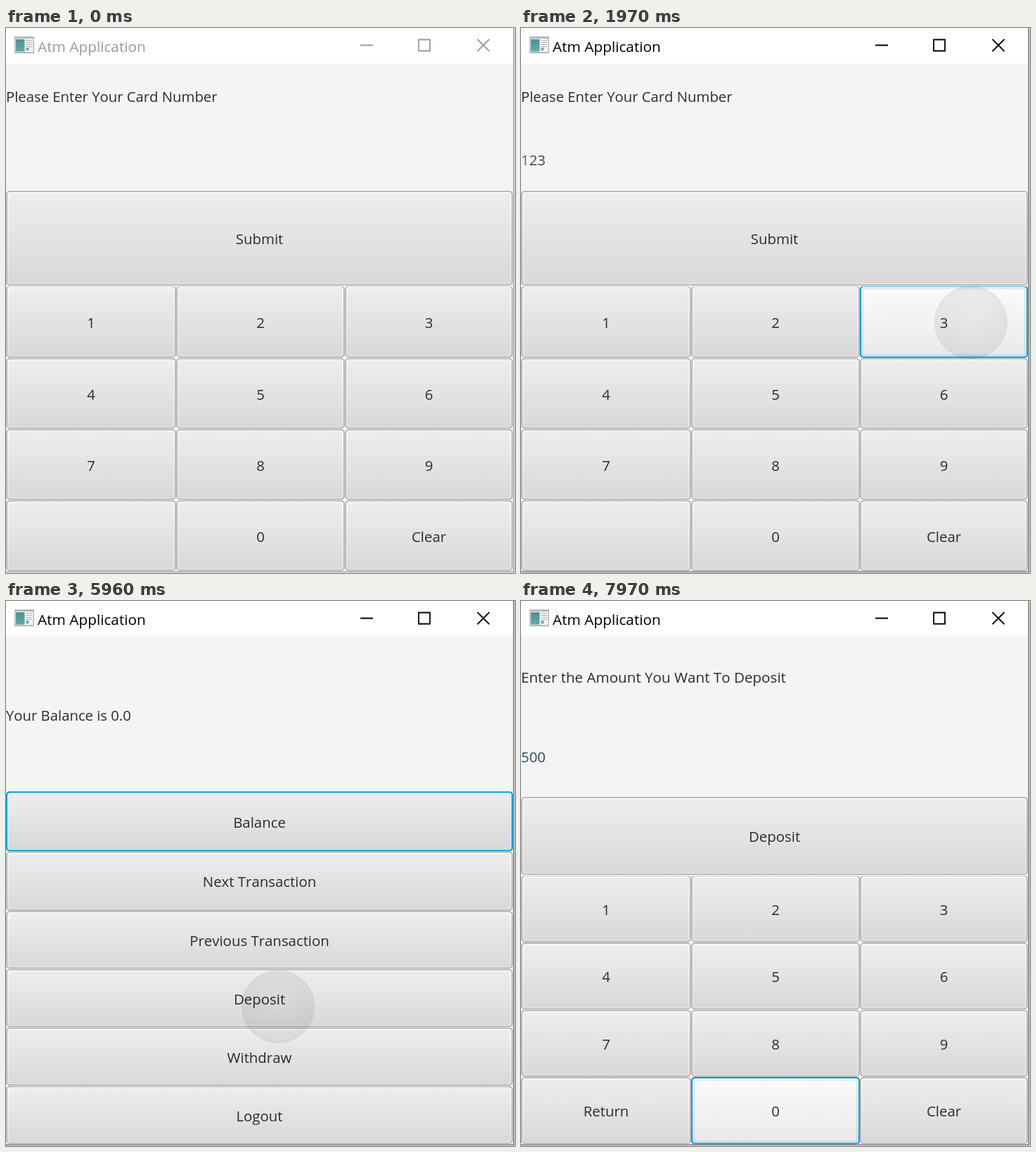
Animation, 724 px wide and 774 px high, one loop 8 s. Source, as an HTML page with a canvas:

```html
<!DOCTYPE html>
<html lang="en">
<head>
<meta charset="utf-8">
<title>Atm Application</title>
<style>
  html, body { margin: 0; width: 100%; height: 100%; overflow: hidden; background: #f4f4f4; }
  canvas { display: block; width: 724px; height: 774px; }
</style>
</head>
<body>
<canvas id="stage" width="724" height="774"></canvas>
<script>
const ctx = document.getElementById('stage').getContext('2d');
const LOOP = 8000;
const COLUMNS = [0, 242, 482, 721];

const SCREENS = {
  card: {
    prompt: 'Please Enter Your Card Number', promptY: 97, entryY: 187,
    action: 'Submit', top: 231, rows: [366, 468.5, 569.5, 670.5, 771.5], corner: ''
  },
  deposit: {
    prompt: 'Enter the Amount You Want To Deposit', promptY: 108, entryY: 221.5,
    action: 'Deposit', top: 278, rows: [389.5, 485, 580.5, 676, 771.5], corner: 'Return'
  },
  menu: {
    prompt: 'Your Balance is 0.0', promptY: 162,
    items: ['Balance', 'Next Transaction', 'Previous Transaction', 'Deposit', 'Withdraw', 'Logout'],
    rows: [270.5, 355.5, 440, 522.5, 605.5, 688.5, 771.5]
  }
};

const START = { screen: 'card', active: false, entry: '', focus: null, hover: null, ripple: null };
const events = [];
const at = (time, patch) => events.push([time, patch]);

// A tap presses a key at once; the touch circle shrinks over the next steps.
function tap(times, x, y, radius, patch) {
  times.forEach((time, i) => {
    const left = 1 - i / 4;
    const ripple = i < 3 ? { x, y, r: radius * left, strength: left } : null;
    at(time, i ? { ripple } : { ...patch, ripple });
  });
}
const key = (label, entry) => ({ focus: label, hover: label, entry });

at(1130, { active: true, ripple: { x: 178, y: 432, r: 52, strength: 1 } });
at(1200, { focus: '1', hover: '1', ripple: { x: 178, y: 432, r: 46, strength: 1 } });
at(1280, { entry: '1', ripple: { x: 178.5, y: 432, r: 39, strength: 0.85 } });
tap([1510, 1590, 1660, 1740], 400, 418, 52, key('2', '12'));
tap([1970, 2050, 2130, 2210], 640, 418, 52, key('3', '123'));
tap([2440, 2520, 2600, 2690], 195, 540, 30, key('4', '1234'));
tap([3230, 3310, 3390, 3470], 410, 300, 52, { focus: 'Submit', hover: 'Submit' });
at(3310, { screen: 'menu', focus: 'Balance', hover: null, entry: '' });
tap([5960, 6050], 387, 576, 52, {});
at(6050, { focus: 'Deposit', hover: 'Deposit' });
at(6120, { screen: 'deposit', focus: '1', hover: null, ripple: null });
tap([6890, 6970, 7040, 7120], 383, 530, 52, key('5', '5'));
tap([7500, 7580, 7660], 383, 723, 52, key('0', '50'));
tap([7740, 7820, 7890, 7970], 383, 723, 52, key('0', '500'));

function stateAt(time) {
  const state = { ...START };
  for (const [when, patch] of events) if (when <= time) Object.assign(state, patch);
  return state;
}

function text(str, x, middle, { align = 'left', color = '#2c2c2c', size = 20.4 } = {}) {
  ctx.font = `${size}px "Open Sans", "Noto Sans", sans-serif`;
  ctx.fontKerning = 'none';
  ctx.textAlign = align;
  ctx.fillStyle = color;
  ctx.fillText(str, x, middle + 7.5);
}

function shade(y, h, from, to) {
  const g = ctx.createLinearGradient(0, y, 0, y + h);
  g.addColorStop(0, from);
  g.addColorStop(1, to);
  return g;
}

function panel(x, y, w, h, inset, radius, fill) {
  ctx.beginPath();
  ctx.roundRect(x + inset, y + inset, w - 2 * inset, h - 2 * inset, radius);
  ctx.fillStyle = fill;
  ctx.fill();
}

function button(label, x, y, x2, y2, state) {
  const w = x2 - x, h = y2 - y;
  const focused = label !== '' && label === state.focus;
  const hovered = label !== '' && label === state.hover;
  const body = hovered ? shade(y, h, '#fbfbfb', '#e9e9e9') : shade(y, h, '#eeeeee', '#d8d8d8');
  if (focused) {
    panel(x, y, w, h, -0.6, 6, 'rgba(3,158,211,0.16)');
    panel(x, y, w, h, 0, 5, '#0a9cd3');
    panel(x, y, w, h, 2, 3.5, shade(y, h, '#f4fbfd', '#dceaf0'));
    panel(x, y, w, h, 3.2, 3, shade(y, h, '#d9eaf0', '#c6dae2'));
    panel(x, y, w, h, 5, 2, body);
  } else {
    panel(x, y + 1.6, w, h, 0, 5, 'rgba(255,255,255,0.8)');
    panel(x, y, w, h, 0.2, 5, '#b3b3b3');
    panel(x, y, w, h, 2, 3.5, shade(y, h, '#fdfdfd', '#e3e3e3'));
    panel(x, y, w, h, 3.6, 2, body);
  }
  text(label, x + w / 2, y + h / 2 + 1, { align: 'center' });
}

function titleBar(active) {
  const ink = active ? '#000000' : '#999999';
  ctx.fillStyle = '#ffffff';
  ctx.fillRect(0, 0, 724, 50.5);

  ctx.fillStyle = '#b4b9ba';
  ctx.fillRect(12, 12, 28, 24);
  ctx.fillStyle = '#f3f5f5';
  ctx.fillRect(13.5, 15, 25, 19);
  ctx.fillStyle = shade(16, 17, '#4b8f92', '#66aaa5');
  ctx.fillRect(14, 16, 12.5, 17.5);
  ctx.fillStyle = '#a9b0b0';
  for (let y = 17; y < 27; y += 3) ctx.fillRect(28.5, y, 8.5, 1);
  ctx.fillStyle = '#70a9a8';
  ctx.fillRect(28.5, 28, 4, 4);

  text('Atm Application', 45, 26, { color: ink, size: 20.8 });
  ctx.strokeStyle = ink;
  ctx.lineWidth = 1.8;
  ctx.beginPath();
  ctx.moveTo(504, 24.5);
  ctx.lineTo(522, 24.5);
  ctx.rect(587, 16.5, 16, 16);
  ctx.moveTo(670.5, 16);
  ctx.lineTo(687.5, 33);
  ctx.moveTo(687.5, 16);
  ctx.lineTo(670.5, 33);
  ctx.stroke();
}

function windowEdge(active) {
  ctx.fillStyle = active ? '#777777' : '#a8a4a4';
  ctx.fillRect(721.4, 0, 1.6, 773);
  ctx.fillRect(0, 771.6, 723, 1.6);
  ctx.fillStyle = '#e9e9e9';
  ctx.fillRect(723, 0, 1, 774);
  ctx.fillRect(0, 773.2, 724, 0.8);
}

function keypad(screen, state) {
  const labels = ['1', '2', '3', '4', '5', '6', '7', '8', '9', screen.corner, '0', 'Clear'];
  labels.forEach((label, i) => {
    const col = i % 3, row = Math.floor(i / 3);
    button(label, COLUMNS[col], screen.rows[row], COLUMNS[col + 1], screen.rows[row + 1], state);
  });
  button(screen.action, 0, screen.top, 721, screen.rows[0], state);

  const onCard = state.screen === 'card';
  const first = state.entry.slice(0, 1);
  text(first, 0, screen.entryY, { color: onCard ? '#3f7090' : '#2c5361' });
  const offset = ctx.measureText(first).width;
  text(state.entry.slice(1), offset, screen.entryY, { color: onCard ? '#404448' : '#2d4650' });
}

function menu(screen, state) {
  screen.items.forEach((label, i) => {
    button(label, 0, screen.rows[i], 721, screen.rows[i + 1], state);
  });
}

function touch({ x, y, r, strength }) {
  const g = ctx.createRadialGradient(x, y, 0, x, y, r);
  g.addColorStop(0, `rgba(0,0,0,${0.045 * strength})`);
  g.addColorStop(0.9, `rgba(0,0,0,${0.065 * strength})`);
  g.addColorStop(1, `rgba(0,0,0,${0.08 * strength})`);
  ctx.fillStyle = g;
  ctx.beginPath();
  ctx.arc(x, y, r, 0, 2 * Math.PI);
  ctx.fill();
}

function draw(time) {
  const state = stateAt(time);
  const screen = SCREENS[state.screen];
  ctx.fillStyle = '#f4f4f4';
  ctx.fillRect(0, 0, 724, 774);
  titleBar(state.active);
  text(screen.prompt, 0, screen.promptY, { size: state.screen === 'deposit' ? 20.6 : 20.3 });
  (screen.items ? menu : keypad)(screen, state);
  windowEdge(state.active);
  if (state.ripple) touch(state.ripple);
}

const begin = performance.now();
function tick() {
  draw((performance.now() - begin) % LOOP);
  requestAnimationFrame(tick);
}
tick();
</script>
</body>
</html>
```
